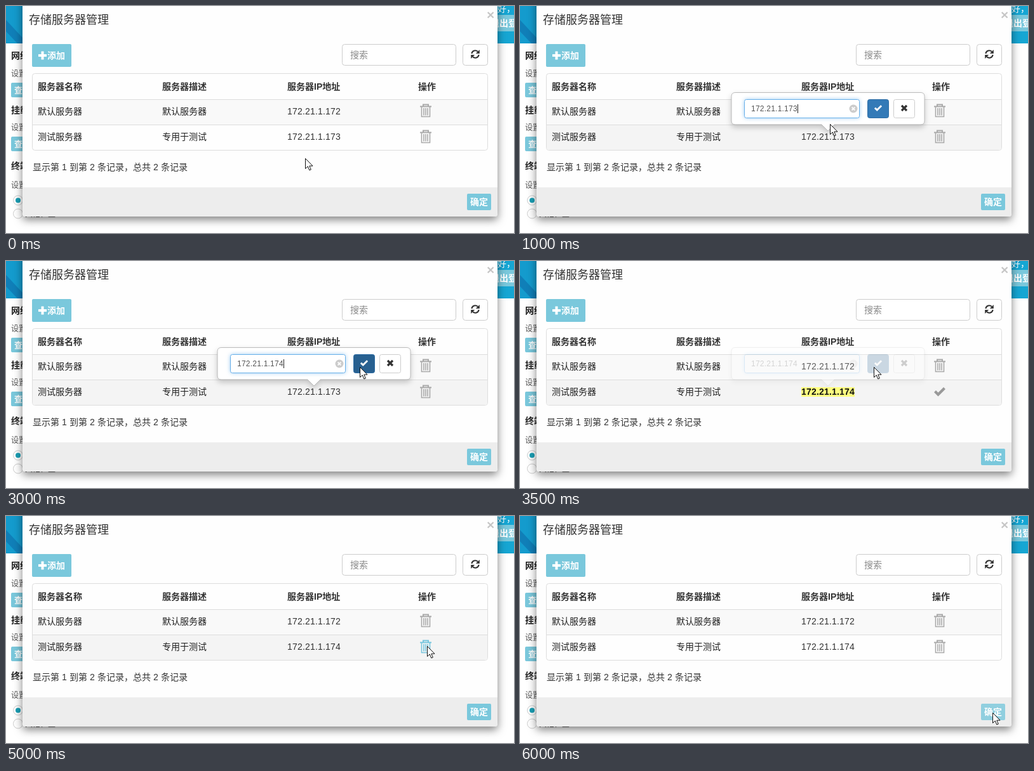
An HTML page that plays this animation: 800 by 358 pixels, repeating every 6.5 s.

```html
<!DOCTYPE html>
<html lang="zh-CN">
<head>
<meta charset="utf-8">
<style>
html, body { margin: 0; width: 100%; height: 100%; overflow: hidden; background: #fff; }
svg { display: block; font: 14px "Liberation Sans", Arial, "Noto Sans CJK SC", "Noto Sans CJK", sans-serif; fill: #222; }
.b { font-weight: bold; }
.head { font-weight: bold; fill: #333; }
.small { font-size: 12px; fill: #555; }
.num { letter-spacing: .19px; fill: #333; }
.white { fill: #fff; }
.blue { fill: #7ac8dc; }
.box { fill: #fff; stroke: #ccc; }
.icon { fill: currentColor; color: #aaa; }
#modal { fill: #fefefe; filter: drop-shadow(0 5px 7px rgba(0,0,0,.5)); }
#popBox { fill: #fff; stroke: #bbb; filter: drop-shadow(0 4px 4px rgba(0,0,0,.2)); }
#field { fill: #fff; stroke: #66afe9; filter: drop-shadow(0 0 3px rgba(102,175,233,.6)); }
#tip rect { filter: drop-shadow(3px 3px 1px rgba(0,0,0,.35)); }
</style>
</head>
<body>
<svg width="800" height="358" viewBox="0 0 800 358">
  <defs>
    <path id="check" d="M-9 1l3-3 3.5 3.5L6-7l3 3L-2.5 7.5z"/>
    <path id="cross" d="M-4-4L4 4M4-4L-4 4"/>
    <g id="trash" fill="none" stroke="currentColor" stroke-width="1.6">
      <path d="M-9-6.5H9M-4-7V-9.5H4V-7" stroke-width="2"/>
      <path d="M-6.5-6V9.5H6.5V-6M-3-4V7.5M0-4V7.5M3-4V7.5"/>
    </g>
    <g id="turn">
      <path d="M-5.6-.8A5.6 5.6 0 0 1 4-4" fill="none" stroke="#333" stroke-width="2"/>
      <path d="M6.8-7V-1H.8z"/>
    </g>
    <linearGradient id="tipFill" x2="0" y2="1">
      <stop stop-color="#fff"/><stop offset="1" stop-color="#e4e5f0"/>
    </linearGradient>
  </defs>

  <!-- page behind the dialog -->
  <rect width="800" height="59" fill="#16a6d3"/>
  <path d="M0 0H26V59H0z" fill="#149bcd"/>
  <path d="M0 22L26 50V59H18L0 40z" fill="#107fb8"/>
  <text class="white" x="760" y="9">您好，</text>
  <rect class="blue" x="755" y="14" width="60" height="26"/>
  <text class="white b" x="763" y="32">退出登录</text>
  <g class="b">
    <text x="8" y="83">网络存储</text>
    <text x="8" y="169">挂载存储</text>
    <text x="8" y="257">终端存储</text>
  </g>
  <g class="small">
    <text x="8" y="111">设置网络</text>
    <text x="8" y="196">设置挂载</text>
    <text x="8" y="287">设置终端</text>
    <text x="30" y="332" fill="#222">其他位置</text>
  </g>
  <rect class="blue" x="8" y="121" width="50" height="23" rx="2"/>
  <rect class="blue" x="8" y="206" width="50" height="23" rx="2"/>
  <g class="white b" font-size="13">
    <text x="13" y="137">查看</text>
    <text x="13" y="222">查看</text>
  </g>
  <g class="box">
    <circle cx="19" cy="306.500" r="7.500"/>
    <circle cx="19" cy="327.500" r="7.500"/>
  </g>
  <circle cx="19" cy="306.500" r="4" fill="#1a9fb4"/>

  <!-- dialog -->
  <path id="modal" d="M26-20H774V328q0 4-4 4H30q-4 0-4-4z"/>
  <path d="M26 286H774V328q0 4-4 4H30q-4 0-4-4z" fill="#ededed"/>
  <text x="36" y="28" font-size="18" fill="#333">存储服务器管理</text>
  <text class="b" x="757" y="21" font-size="21" fill="#c6c6c6">×</text>

  <rect class="blue" x="41" y="60" width="62" height="36" rx="2"/>
  <path d="M51 78H64M57.500 71.500V84.500" stroke="#fff" stroke-width="4"/>
  <text class="white b" x="65" y="83">添加</text>
  <rect class="box" x="529.500" y="60.500" width="179" height="33" rx="4"/>
  <text x="542" y="82" fill="#888">搜索</text>
  <rect class="box" x="719.500" y="60.500" width="39" height="33" rx="4"/>
  <g transform="translate(739 76)" fill="#333">
    <use href="#turn"/><use href="#turn" transform="rotate(180)"/>
  </g>

  <rect x="41.500" y="106.500" width="717" height="121" rx="4" fill="#fefefe" stroke="#ddd"/>
  <rect x="42" y="148" width="716" height="39" fill="#f9f9f9"/>
  <path id="row" d="M42 188H758V224q0 3-3 3H45q-3 0-3-3z" fill="#f4f4f4"/>
  <path d="M42 147.500H758M42 187.500H758" stroke="#ddd"/>
  <g class="head">
    <text x="50" y="132">服务器名称</text>
    <text x="246" y="132">服务器描述</text>
    <text x="443" y="132">服务器IP地址</text>
    <text x="649" y="132">操作</text>
  </g>
  <text x="50" y="171">默认服务器</text>
  <text x="246" y="171">默认服务器</text>
  <text class="num" x="443" y="171">172.21.1.172</text>
  <text x="50" y="211">测试服务器</text>
  <text x="246" y="211">专用于测试</text>
  <rect id="mark" x="443" y="199" width="84" height="15" fill="#ffff80"/>
  <text id="ip" class="num" x="443" y="211"></text>
  <use class="icon" href="#trash" x="661" y="165"/>
  <use class="icon" id="action" x="661" y="206"/>
  <text x="42" y="259" fill="#333" word-spacing=".2">显示第 1 到第 2 条记录，总共 2 条记录</text>

  <rect id="ok" class="blue" x="726" y="296" width="38" height="26" rx="2"/>
  <text class="white b" x="731" y="314">确定</text>

  <!-- inline editor -->
  <g id="pop">
    <path id="popBox" d="M339 136.500H631q6 0 6 6V181q0 6-6 6H495L485 197 475 187H339q-6 0-6-6V142.500q0-6 6-6z"/>
    <rect id="field" x="353.500" y="147.500" width="181" height="29" rx="3"/>
    <text id="value" class="small" x="364" y="166" letter-spacing=".23"></text>
    <path id="caret" d="M0 155V169" stroke="#222"/>
    <circle cx="525" cy="162" r="6.500" fill="#ccc"/>
    <use href="#cross" transform="translate(525 162) scale(.6)" stroke="#fff" stroke-width="3"/>
    <rect id="save" x="547.500" y="147.500" width="33" height="29" rx="3" stroke="#2e6da4"/>
    <use class="white" href="#check" transform="translate(564 161) scale(.68)"/>
    <rect class="box" x="588.500" y="147.500" width="33" height="29" rx="3"/>
    <use href="#cross" transform="translate(605 161)" stroke="#333" stroke-width="3.200"/>
  </g>

  <g id="tip">
    <rect x="663.500" y="226.500" width="36" height="20" rx="2.500" fill="url(#tipFill)" stroke="#767676"/>
    <text class="small" x="669" y="241">保存</text>
  </g>
  <path id="arrow" d="M.5.500V16.500L4.300 13 6.800 19 9.300 18 6.800 12.200H12z" fill="#fff" stroke="#111"/>
  <path id="beam" d="M-3.500-7.500H-1L0-6.500 1-7.500H3.500M-3.500 7.500H-1L0 6.500 1 7.500H3.500M0-7V7" fill="none" stroke="#222"/>
</svg>
<script>
const STEP = 500;
const el = id => document.getElementById(id);
const set = (id, attrs) => {
  for (const name in attrs) el(id).setAttribute(name, attrs[name]);
};
const show = (id, opacity) => set(id, { opacity: Number(opacity) });

// Each step lists only what differs from the one before it.
const steps = [
  { x: 471, y: 240, ip: '172.21.1.173', value: '172.21.1.173', caret: 437.5, pop: 0, icon: 'trash' },
  { x: 488, y: 210, row: true },
  { x: 488, y: 186, pop: 1 },
  { x: 478.5, y: 168, beam: true },
  { value: '172.21.1.17', caret: 430.5 },
  { value: '172.21.1.174', caret: 437.5 },
  { x: 557, y: 167, beam: false, saveHover: true },
  { pop: .22, caret: 0, ip: '172.21.1.174', bold: true, mark: true, icon: 'check' },
  { x: 663, y: 205, pop: 0, mark: false, iconHover: true, tip: true },
  { tip: false },
  { bold: false, icon: 'trash' },
  { x: 715, y: 304, row: false, iconHover: false },
  { x: 744, y: 310, okHover: true }
];
const states = steps.map((_, i) => Object.assign({}, ...steps.slice(0, i + 1)));

function render(s) {
  el('ip').textContent = s.ip;
  el('value').textContent = s.value;
  set('ip', { style: s.bold ? 'font-weight:bold;fill:#111' : '' });
  set('action', { href: '#' + s.icon, style: `color:${s.iconHover ? '#78c6de' : s.icon === 'check' ? '#999' : '#aaa'}` });
  set('save', { fill: s.saveHover ? '#286090' : '#337ab7' });
  set('caret', { transform: `translate(${s.caret})` });
  show('caret', s.caret);
  show('row', !!s.row);
  show('mark', !!s.mark);
  show('pop', s.pop);
  show('tip', !!s.tip);
  show('ok', s.okHover ? .8 : 1);
  show('beam', !!s.beam);
  show('arrow', !s.beam);
  for (const id of ['beam', 'arrow']) set(id, { transform: `translate(${s.x} ${s.y})` });
}

let current;
function frame() {
  const state = states[Math.floor(performance.now() / STEP) % states.length];
  if (state !== current) render(current = state);
  requestAnimationFrame(frame);
}
frame();
</script>
</body>
</html>
```
